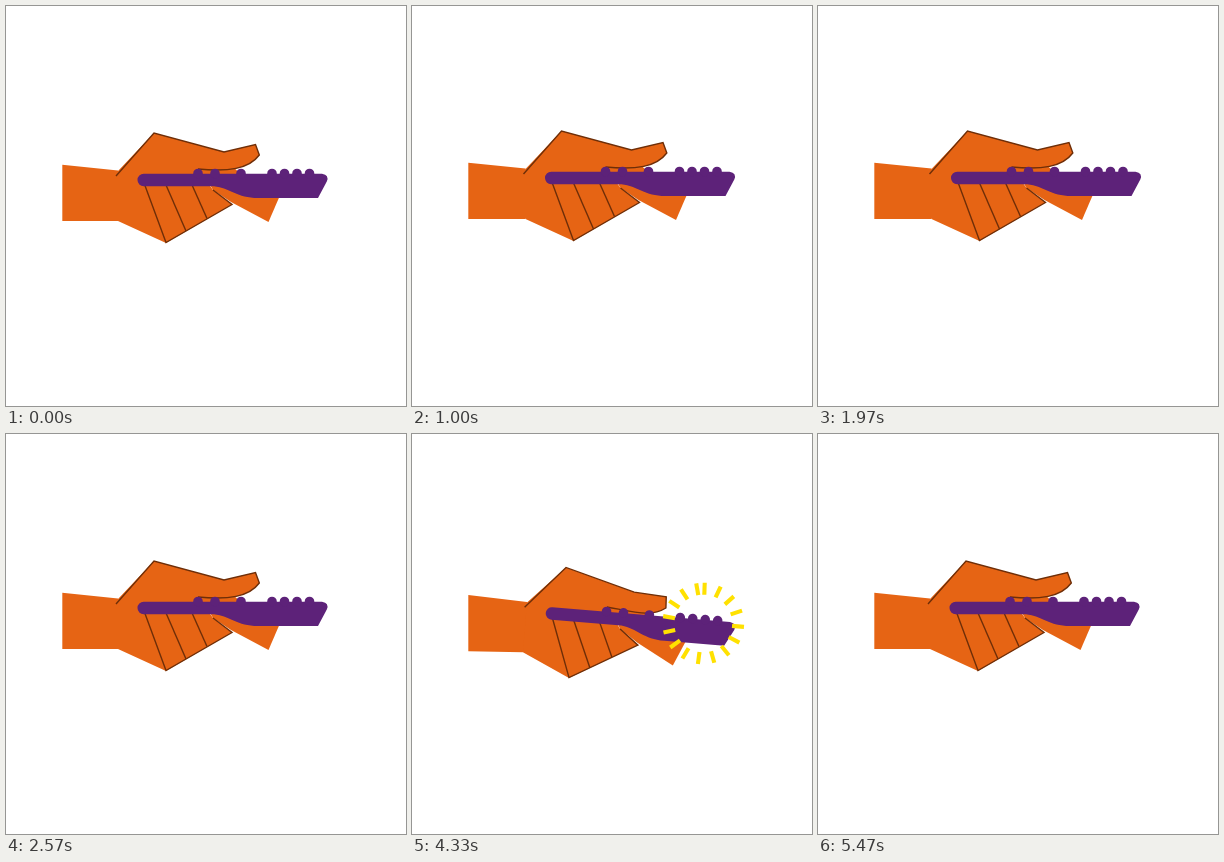
An HTML page with a canvas for the animation above (5.73 s loop, 400 by 400 pixels).

```html
<!DOCTYPE html>
<html lang="en">
<head>
<meta charset="utf-8">
<title>Remote control</title>
<style>
html, body { margin: 0; height: 100%; overflow: hidden; background: #fff; }
canvas { display: block; width: 400px; height: 400px; }
</style>
</head>
<body>
<canvas id="stage" width="400" height="400"></canvas>
<script>
const ctx = document.getElementById('stage').getContext('2d');
const ORANGE = '#e66414', BROWN = '#6e2e08', PURPLE = '#5d2279', YELLOW = '#ffe100';
const LOOP = 5730;
const PRESS_STARTS = [70, 1000, 1970, 2930, 3900, 4870];
const PRESS_LENGTH = 600;
const WRIST = [100, 195], KNUCKLE = [218, 146];

// time, arm dx, arm dy, hand degrees, thumb degrees
const KEYS = [
  [0, 1.5, -2, 0, 0],
  [170, 6, -14, -9, -28],
  [240, 5, -13, -10, -28],
  [350, 0.6, 3, 5.4, 20],
  [430, 0.6, 2.3, 4.7, 17],
  [580, 0, 0, 0, 0]
];

function poseAt(t) {
  if (t < 0 || t >= 580) return [0, 0, 0, 0];
  const i = KEYS.findIndex(key => key[0] > t);
  const a = KEYS[i - 1], b = KEYS[i];
  const u = (1 - Math.cos(Math.PI * (t - a[0]) / (b[0] - a[0]))) / 2;
  return a.slice(1).map((v, k) => v + (b[k + 1] - v) * u);
}

function rotate([x, y], [cx, cy], degrees) {
  const r = degrees * Math.PI / 180, c = Math.cos(r), s = Math.sin(r);
  return [cx + (x - cx) * c - (y - cy) * s, cy + (x - cx) * s + (y - cy) * c];
}

function lines(...points) {
  ctx.beginPath();
  points.forEach(p => ctx.lineTo(...p));
}

function fill(color) {
  ctx.fillStyle = color;
  ctx.fill();
}

function stroke(color, width) {
  ctx.strokeStyle = color;
  ctx.lineWidth = width;
  ctx.stroke();
}

function drawForearm(dx, dy, turn) {
  const joint = (x, y) => {
    const p = rotate([x, y], WRIST, turn);
    return [p[0] + dx, p[1] + dy];
  };
  lines([56.3, 158.8 + dy], joint(112, 164.6), joint(122, 190), joint(112, 215), [56.3, 215 + dy]);
  fill(ORANGE);
}

function traceThumb(bend) {
  const at = (x, y) => rotate([x, y], KNUCKLE, bend);
  ctx.lineTo(...KNUCKLE);
  ctx.lineTo(...at(249.5, 138.5));
  ctx.lineTo(...at(253.3, 149));
  ctx.bezierCurveTo(...at(243, 163), 222, 166, 192, 163);
}

function drawHand(bend) {
  // fingers behind the remote
  lines([200, 172], [207, 184], [225, 196], [262.5, 216], [275, 187]);
  fill(ORANGE);
  lines([188, 160], [226, 160], [237, 170], [188, 170]);
  fill(ORANGE);

  lines([112, 165], [148, 127]);
  traceThumb(bend);
  [[207, 184], [226, 198.5], [160, 237], [112, 215]].forEach(p => ctx.lineTo(...p));
  fill(ORANGE);

  lines([110, 170], [148, 127]);
  traceThumb(bend);
  stroke(BROWN, 1.4);
  lines([138.4, 178], [160, 236.5], [226, 198.5], [207, 184]);
  stroke(BROWN, 1.4);
  lines([159.6, 178], [180, 225]);
  stroke(BROWN, 1.4);
  lines([185.6, 178], [201, 212.5]);
  stroke(BROWN, 1.4);
}

function drawRemote() {
  ctx.beginPath();
  ctx.arc(137.7, 174, 6.2, Math.PI / 2, Math.PI * 1.5);
  ctx.lineTo(316, 167.8);
  ctx.quadraticCurveTo(323.5, 169, 320.8, 175.5);
  ctx.lineTo(312, 192);
  ctx.lineTo(252, 192);
  ctx.bezierCurveTo(231, 192, 224, 182, 208, 180.2);
  fill(PURPLE);
  for (const x of [192, 209, 235, 266, 278.5, 291, 303.5]) {
    ctx.beginPath();
    ctx.arc(x, 167.5, 4.8, 0, Math.PI * 2);
    fill(PURPLE);
  }
}

function drawRays(t) {
  if (t < 345 || t >= PRESS_LENGTH) return;
  const outer = Math.min(85, 40.5 + (t - 430) * 0.32);
  const inner = Math.max(0, outer - 12);
  for (let i = 0; i < 16; i++) {
    const a = (-88 + 23.2 * i) * Math.PI / 180;
    const at = r => [291.3 + r * Math.cos(a), 189.5 + r * Math.sin(a)];
    lines(at(inner), at(outer));
    stroke(YELLOW, 4.1);
  }
}

function frame() {
  const now = performance.now() % LOOP;
  const start = PRESS_STARTS.filter(s => s <= now).pop();
  const t = start === undefined ? -1 : now - start;
  const [dx, dy, turn, bend] = poseAt(t);

  ctx.clearRect(0, 0, 400, 400);
  drawForearm(dx, dy, turn);
  ctx.save();
  ctx.translate(WRIST[0] + dx, WRIST[1] + dy);
  ctx.rotate(turn * Math.PI / 180);
  ctx.translate(-WRIST[0], -WRIST[1]);
  drawHand(bend);
  drawRemote();
  ctx.restore();
  drawRays(t);
  requestAnimationFrame(frame);
}
frame();
</script>
</body>
</html>
```
